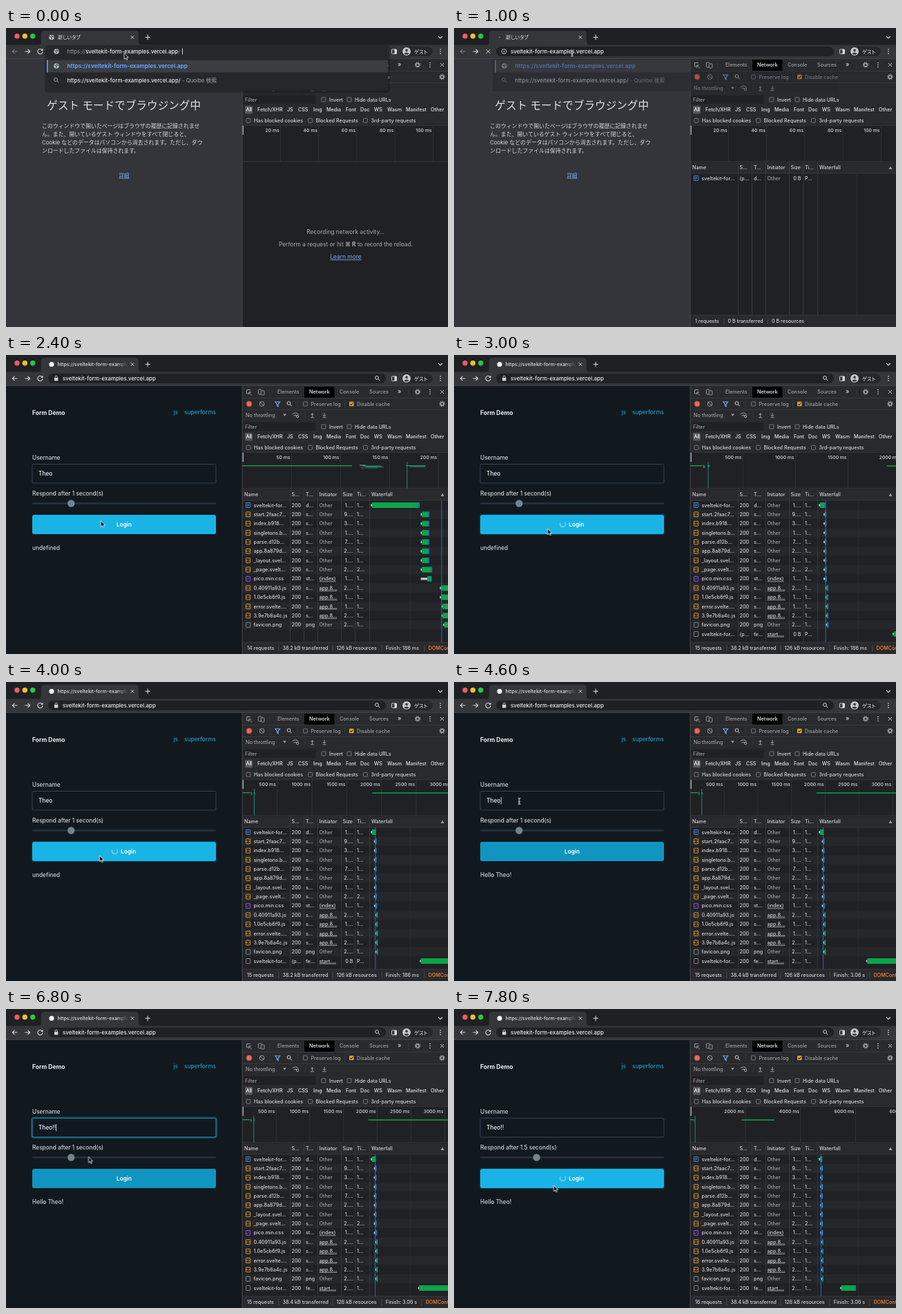
These frames come from a looping animation (640x434 px, 8 s). An HTML page:

```html
<!DOCTYPE html>
<html lang="ja">
<head>
<meta charset="utf-8">
<title>Form demo</title>
<style>
html, body { margin: 0; width: 100%; height: 100%; overflow: hidden; background: #202124; }
svg { display: block; width: 100vw; height: 100vh; font-family: Inter, "Noto Sans CJK JP", "Noto Sans", sans-serif; font-weight: 500; }
.thin { font-weight: 400; }
.phase { animation: 8s step-end -30ms infinite; }
.pointer { animation: move 8s ease-in-out -30ms infinite; }
.spin { animation: spin 1s steps(5) -30ms infinite; }
.late { animation-delay: -230ms; }
.kana { font-feature-settings: "palt"; }
@keyframes spin { to { transform: rotate(360deg); } }
@keyframes move {
  0%, 22% { transform: translate(171px, 36.5px); }
  32%, 53% { transform: translate(135.5px, 252px); }
  57%, 77.5% { transform: translate(94.5px, 173px); }
  83.5%, 90% { transform: translate(119.5px, 214.5px); }
  95%, 100% { transform: translate(144.5px, 256px); }
}
</style>
</head>
<body>
<svg id="stage" viewBox="0 0 640 434"></svg>
<script>
const LOOP = 8000;
const INK = '#d2d4d7', DIM = '#9aa0a6', LINE = '#3e4145', BAR = '#292a2d', DARK = '#202124';
const GREEN = '#0ba54a', BLUE = '#1a86e8', LINK = '#7cacf8';
const rules = {};

// Markup shown only between two times of the loop.
function during(from, to, markup) {
  const name = `from${from}to${to}`;
  const pc = ms => ms / LOOP * 100 + '%';
  rules[name] = `@keyframes ${name}{0%{opacity:0}${pc(from)}{opacity:1}${pc(to)}{opacity:0}}`;
  return `<g class="phase" style="animation-name:${name}">${markup}</g>`;
}
const text = (x, y, s, fill = INK, size = 7.2, extra = '') =>
  `<text x="${x}" y="${y + size * .36}" fill="${fill}" font-size="${size}" ${extra}>${s}</text>`;
const box = (x, y, w, h, fill, extra = '') =>
  `<rect x="${x}" y="${y}" width="${w}" height="${h}" fill="${fill}" ${extra}/>`;
const dot = (x, y, r, fill, extra = '') => `<circle cx="${x}" cy="${y}" r="${r}" fill="${fill}" ${extra}/>`;
const line = (d, stroke = INK, w = 1, extra = '') =>
  `<path d="${d}" fill="none" stroke="${stroke}" stroke-width="${w}" ${extra}/>`;
const frame = (x, y, w, h, stroke, r = 1, fill = 'none') =>
  box(x, y, w, h, fill, `rx="${r}" stroke="${stroke}" stroke-width=".9"`);
const cross = (x, y, r, c = INK) => line(`M${x - r} ${y - r}l${2 * r} ${2 * r}m0 ${-2 * r}l${-2 * r} ${2 * r}`, c);
const dots = (x, y) => [-3, 0, 3].map(d => dot(x, y + d, .85, INK)).join('');
const lens = (x, y, c = INK) => dot(x - 1, y - 1, 2.4, 'none', `stroke="${c}"`) + line(`M${x + 1} ${y + 1}l2.4 2.4`, c);
const gear = (x, y) => dot(x, y, 2.3, 'none', `stroke="${DIM}" stroke-width="1.6"`) +
  dot(x, y, 3.6, 'none', `stroke="${DIM}" stroke-width="1.3" stroke-dasharray="1.4 1.43"`);
const globe = (x, y) => dot(x, y, 3.8, '#b9bcc0') + line(`M${x - 3} ${y - 1}l2.5 .5 1 1.5-1.5 2M${x} ${y - 3.4}l.5 2 2.8 .8`, '#4a4d52', 1.1);
const check = (x, y, label, c = INK) => frame(x - 3, y - 3, 6, 6, '#7d8186') + text(x + 8, y, label, c);
const thin = markup => `<g class="thin">${markup}</g>`;
const bold = 'font-weight="700"', semi = 'font-weight="600"';
const mid = 'text-anchor="middle"';

/* ---------- browser window ---------- */
const SITE = 'sveltekit-form-examples.vercel.app';

function chrome() {
  return box(0, 0, 640, 25, '#1f2023') +
    dot(16, 11.8, 3.7, '#ec5f57') + dot(27.3, 11.8, 3.7, '#f4bd2e') + dot(38.7, 11.8, 3.7, '#29c840') +
    '<path d="M46 25q5 0 5-5V9q0-5 5-5h131q5 0 5 5v11q0 5 5 5z" fill="#35363a"/>' +
    cross(183, 13.5, 2.1) + line('M201.500 13.500h7.500m-3.750-3.750v7.500', '#d6d8db', 1.1) +
    line('M626 12l3 3 3-3', INK, 1.1) +
    box(0, 24.500, 640, 20, '#35363a') + box(0, 44, 640, .8, '#47494d') +
    during(0, 1200, backArrow('#797c80')) + during(1200, 8000, backArrow(INK)) +
    line('M27.500 34h7m-3-3.200l3.200 3.200-3.200 3.200', '#dcdee1', 1.1) +
    during(0, 1000, reload()) + during(1000, 1200, cross(49.5, 34, 2.8, '#dcdee1')) + during(1200, 8000, reload()) +
    frame(558.5, 31, 7, 6.5, '#dcdee1') + box(562.500, 31, 3, 6.500, '#dcdee1') +
    box(573, 27, 45, 14, '#25272a', 'rx="7"') + dot(580, 34, 6, '#c4c7cb') +
    dot(580, 32.300, 1.900, '#3c4043') + '<path d="M576.300 37.500q3.700-4 7.400 0-3.700 2.500-7.400 0z" fill="#3c4043"/>' +
    text(591, 34, 'ゲスト', '#e8eaed', 7.4, 'class="kana"') + dots(629, 34) +
    during(0, 1000, globe(66, 13.5)) + during(1000, 1200, dot(66, 13.5, .8, DIM)) +
    during(0, 1200, text(75, 13.5, '新しいタブ', '#dfe1e4', 7.2, 'class="kana"')) +
    during(1200, 8000, dot(66, 13.5, 3.6, '#f1f3f4') +
      `<g mask="url(#fade)">${text(74.5, 13.5, 'https://' + SITE, '#dfe1e4', 7, 'clip-path="url(#tab)"')}</g>`);
}
const backArrow = c => line('M16.500 34h-7m3-3.200l-3.200 3.200 3.200 3.200', c, 1.1);
const reload = () => line('M52.300 31.800a3.600 3.600 0 1 0 .8 2.600', '#dcdee1', 1.1) + '<path d="M53.500 29.800v3.200h-3.200z" fill="#dcdee1"/>';

function addressBar() {
  const lock = box(70, 33, 5.4, 4.4, INK, 'rx=".7"') + line('M71.200 33v-1.300a1.500 1.500 0 0 1 3 0v1.300', INK, .9);
  const info = dot(72.5, 34, 3.4, 'none', `stroke="${INK}" stroke-width=".9"`) + line('M72.500 33.300v2.600m0-4v.8', INK, .9);
  return during(1000, 8000, box(61, 27, 489, 14, DARK, 'rx="7"') + text(82, 34, SITE, '#eceef0', 7.9)) +
    during(1000, 1200, info) + during(1200, 8000, lock + lens(538, 34));
}

function suggestions() {
  const rows = width => box(59, 46.500, width, 18, '#3a3d42') + box(59, 46.500, 1.800, 18, '#5a94f2') + globe(73, 55) +
    text(88.5, 55, 'https://' + SITE, '#659df6', 8.2, bold) + lens(73, 76, DIM) +
    text(88.5, 76, `https://${SITE}/<tspan fill="#a0a4a9" font-weight="400"> - Quolbe 検索</tspan>`, '#e8eaed', 7.85);
  const open = box(56, 25, 500, 69, '#000', 'rx="5" opacity=".22"') + box(59, 25, 494, 66, '#25272b', 'rx="4"') + globe(73, 34) +
    text(88.5, 34, `https://<tspan fill="#f0f1f3" font-weight="500">${SITE}</tspan>/`, DIM, 7.85, 'class="thin"') + rows(494);
  const caret = box(255, 29.500, .8, 9, '#fff');
  const fading = `<g opacity=".5">${box(56, 45, 286, 47, '#25272b') + rows(283)}</g>` +
    box(342, 62, 214, 30, '#25272b', 'opacity=".35"');
  return during(0, 1000, open + caret) + during(1000, 1200, fading);
}

/* ---------- page ---------- */
function guestPage() {
  const lines = ['このウィンドウで開いたページはブラウザの履歴に記録されませ', 'ん。また、開いているゲスト ウィンドウをすべて閉じると、',
    'Cookie などのデータはパソコンから消去されます。ただし、ダウ', 'ンロードしたファイルは保持されます。'];
  return box(0, 44.8, 342, 389.2, '#33353a') +
    thin(text(170.7, 112.5, 'ゲスト モードでブラウジング中', '#dfe1e4', 15.6, mid) +
      lines.map((s, i) => text(52, 142.3 + i * 11.8, s, '#d8dadd', 7.9)).join('') +
      text(171, 214, '詳細', LINK, 7.5, mid + ' text-decoration="underline"'));
}

function button(lit, glow, busy, late) {
  const ring = busy ? `<g transform="translate(157.500 245.500)"><circle class="spin ${late}" r="4" fill="none" stroke="#fff" stroke-opacity=".55" stroke-width="1.200" stroke-dasharray="17 8.130" transform="rotate(-40)"/></g>` : '';
  return (glow ? box(36.3, 230.3, 269.4, 31.4, '#1095c1', 'rx="4" opacity=".15"') : '') +
    box(38, 232, 266, 28, lit ? '#1ab3e6' : '#1095c1', 'rx="2.500"') + ring +
    text(busy ? 177.3 : 171, 245.8, 'Login', '#fff', 8.2, mid + ' ' + semi);
}

function formPage() {
  const label = '#cbd3d9', white = '#edf0f3', link = '#1c97c2', S = 8.3;
  const value = s => text(47, 172.3, s, white, S);
  const caret = x => box(x, 167, .8, 10.5, white);
  const thumb = x => dot(x, 215.5, 5.2, '#73848f');
  return box(0, 44.8, 342, 389.2, '#11191f') +
    text(38, 83.5, 'Form Demo', white, 8.5, bold) +
    text(249, 83.5, 'js', link, S, 'text-anchor="end"') + text(304, 83.5, 'superforms', link, S, 'text-anchor="end"') +
    text(38, 149, 'Username', label, S) +
    frame(38, 158.5, 266, 27.5, '#374956', 2) +
    during(4800, 7000, box(37, 157.5, 268, 29.5, 'none', 'rx="3" stroke="#1095c1" stroke-opacity=".35" stroke-width="2"') +
      frame(38, 158.5, 266, 27.5, '#1495c0', 2)) +
    during(1200, 5600, value('Theo')) + during(5600, 5800, value('Theo!')) + during(5800, 8000, value('Theo!!')) +
    during(4600, 5200, caret(67.9)) + during(5600, 5800, caret(70.2)) + during(5800, 6400, caret(72.4)) + during(6800, 7000, caret(72.4)) +
    during(1200, 7000, text(38, 201.5, 'Respond after 1 second(s)', label, S)) +
    during(7000, 8000, text(38, 201.5, 'Respond after 1.5 second(s)', label, S)) +
    box(38, 214.2, 266, 2.6, '#24333e', 'rx="1.300"') +
    during(1200, 7000, thumb(94.3)) + during(7000, 8000, thumb(119.6)) +
    during(1200, 2400, button()) + during(2400, 2800, button(true)) + during(2800, 3000, button(true, true)) +
    during(3000, 4200, button(true, true, true, '')) + during(4200, 4400, button(true, true)) +
    during(4400, 7500, button()) + during(7500, 7800, button(true)) + during(7800, 8000, button(true, true, true, 'late')) +
    during(1200, 4200, text(38, 280, 'undefined', label, S)) + during(4200, 8000, text(38, 280, 'Hello Theo!', label, S));
}

/* ---------- developer tools ---------- */
function toolbars() {
  const tabs = [[393, 'Elements'], [483, 'Console'], [526, 'Sources']];
  const types = [[364, 'Fetch/XHR'], [407, 'JS'], [423, 'CSS'], [445, 'Img'], [464, 'Media'], [492, 'Font'], [513, 'Doc'],
    [533, 'WS'], [552, 'Wasm'], [579, 'Manifest'], [615, 'Other']];
  const arrow = (x, dir) => line(`M${x} ${87 - 3 * dir}v${5 * dir}m-2.300 ${-2 * dir}l2.300 ${2.2 * dir} 2.300 ${-2.2 * dir}M${x - 2.5} 90.800h5`, DIM);
  return box(342, 44.8, 298, 389.2, DARK) + box(342, 44.8, 298, 97, BAR) +
    box(432, 46, 43.5, 16, '#000') +
    [62, 79, 141.5].map(y => box(342, y, 298, .7, LINE)).join('') +
    line('M354 50.500h-5.500v5.500h2m1-2l4.500 4.500m-4.500-4.500v3.500m0-3.500h3.500', DIM) +
    frame(365.5, 50, 4.5, 7, DIM) + frame(369.5, 52, 4.5, 6, DIM, 1, BAR) + box(381, 49, .7, 10, LINE) +
    tabs.map(([x, s]) => text(x, 53.8, s, DIM)).join('') + text(439, 53.8, 'Network', '#f1f3f4', 7.3) +
    text(567, 53, '»', INK, 9) + box(582, 49, .7, 10, LINE) + gear(596, 53.5) + dots(614, 53.5) + cross(631.5, 53.5, 2.4) +
    dot(352, 71, 3.9, '#e8695f') + dot(352, 71, 4.2, 'none', 'stroke="#8b3a35" stroke-width=".8"') +
    dot(370.5, 71, 3.4, 'none', `stroke="${DIM}"`) + line('M368 68.500l5 5', DIM) + box(382, 66, .7, 10, LINE) +
    line('M389.800 68h7l-2.700 3.400v3.300l-1.600-1v-2.300z', LINK, 1.1) + lens(410.5, 71, INK) + box(422, 66, .7, 10, LINE) +
    check(433.5, 71, 'Preserve log', DIM) + box(490, 66, .7, 10, LINE) +
    box(497, 67.700, 6.600, 6.600, '#f0a02c', 'rx="1"') + line('M498.500 71l1.400 1.500 2.500-3', DARK, 1.1) +
    text(508, 71, 'Disable cache', DIM) + gear(631.5, 71) +
    text(347, 87.3, 'No throttling', DIM) + '<path d="M401 85.500h5l-2.500 3.300z" fill="#9aa0a6"/>' +
    line('M414.500 86q4.500-4 9 0m-7 2.200q2.500-2.200 5 0', DIM) + dot(422, 89, 1.8, 'none', `stroke="${DIM}"`) +
    box(433, 82, .7, 10, LINE) + arrow(443.5, -1) + arrow(461, 1) +
    box(343.5, 97.5, 105, 12.5, DARK) + text(346, 104, 'Filter', DIM) + check(460, 104, 'Invert') + check(497, 104, 'Hide data URLs') +
    box(346, 113, 11, 11.500, '#55585d', 'rx="1.500"') + text(347.5, 118.9, 'All', '#fff', 7.1) + box(360.5, 114, .7, 10, LINE) +
    types.map(([x, s]) => text(x, 118.9, s, '#e4e6e8', 7.15)).join('') +
    check(351, 134.3, 'Has blocked cookies') + check(440.5, 134.3, 'Blocked Requests') + check(520.5, 134.3, '3rd-party requests');
}

// Overview strip: `span` ms across the panel width.
function overview(span, step, loaded) {
  const at = ms => 342 + ms / span * 298;
  const bar = (a, b, y, c = '#1f9a4c', h = 1.4) => box(at(a), y, at(b) - at(a), h, c);
  let out = box(342, 142, 298, 52, DARK);
  for (let ms = step; at(ms) < 670; ms += step)
    out += box(at(ms), 142, .7, 52, '#37393d') + text(at(ms) - 1.5, 149, ms + ' ms', INK, 6.8, 'text-anchor="end"');
  if (loaded) {
    out += bar(0, 112, 160) + bar(120, 126, 159.5, '#8c8f94') + bar(123, 142, 160.5) + bar(126, 144, 162.2, '#2c86b8', 1) +
      bar(121, 138, 163.5, '#1f7d54', 1) + bar(167, 187, 160) + bar(171, 187, 161.6, '#2c86b8', 1) +
      box(at(168), 155, .9, 39, '#23918c');
    if (span > 1900) out += bar(1870, Math.max(1871, Math.min(3060, span)), 160.3, GREEN, 1.5);
  }
  return out + box(342.3, 142, 1.5, 13, '#c4c6c9') + box(342, 193.5, 298, .8, LINE);
}

const rowY = i => 218 + 13.36 * i;

// Waterfall column: `total` ms across 112 units.
function waterfall(total) {
  const k = 112 / total;
  const bar = (i, start, len, wait = 0) => {
    const x = 528.3 + start * k, y = rowY(i), w = Math.max(.6, len * k), g = x + 1.7 + wait * k;
    return box(x, y - 1.7, 1.7 + wait * k, 3.4, '#c3c5c8') + box(g, y - 4, w, 8, GREEN) + box(g + w, y - 4, 1.4, 8, BLUE);
  };
  let out = box(585, 211, .6, 206, '#303236') + bar(0, 0, 112);
  for (let i = 1; i < 7; i++) out += bar(i, 120, 15);
  out += bar(7, 120, 22) + bar(8, 120, 8, 13);
  for (let i = 9; i < 14; i++) out += bar(i, i < 11 ? 166 : i < 13 ? 170 : 174, 15);
  if (total > 1000) out += bar(14, 1870, 1190);
  return out + box(528 + 170 * k, 211, .9, 206, '#1f78d8');
}

function icon(kind, y) {
  const c = { doc: '#4a8df0', js: '#e8a33a', css: '#a05af0', img: '#8b8f94' }[kind];
  const art = { doc: `M348.800 ${y - 1.3}h3.400m-3.400 1.500h3.400m-3.400 1.500h2`, js: `M349.700 ${y - 1.4}l-1.300 1.400 1.300 1.400m1.600-2.800l1.300 1.400-1.300 1.400`,
    css: `M348.700 ${y + 1.9}l3.400-3.600`, img: '' }[kind];
  return frame(347.5, y - 3.5, 6.2, 7, c, .6) + line(art, c, .8);
}

function row(i, kind, name, status, type, from, size, time) {
  const y = rowY(i), linked = from !== 'Other';
  return icon(kind, y) + text(358.5, y, name) + text(413.5, y, status) + text(434, y, type) +
    text(453.5, y, from, linked ? INK : DIM, 7.2, linked ? 'text-decoration="underline"' : '') +
    text(502.5, y, size, INK, 7.2, 'text-anchor="end"') + text(508, y, time);
}

function table() {
  const edges = [411, 431, 451, 485, 505, 526];
  const heads = [[345, 'Name'], [413.5, 'S…'], [434, 'T…'], [453.5, 'Initiator'], [487.5, 'Size'], [508, 'Ti…'], [529, 'Waterfall']];
  const scripts = [['start.2faac7…', 9], ['index.b918…', 3], ['singletons.b…', 1], ['parse.d12b…', 7], ['app.8a879d…', 2], ['_layout.svel…', 1], ['_page.svelt…', 2]];
  const lazy = [['0.40911a93.js', 2], ['1.0e5cb6f9.js', 1], ['error.svelte.…', 1], ['3.9e7b6a4c.js', 2]];
  const page = 'sveltekit-for…';
  let stripes = '';
  for (let i = 1; i < 15; i += 2) stripes += box(342, rowY(i) - 6.7, 298, 13.36, '#25272a');
  const base = box(342, 194.3, 298, 222.7, DARK) + during(1200, 8000, stripes) +
    box(342, 194.3, 298, 16.5, BAR) + box(342, 210.6, 298, .7, LINE);
  const grid = edges.map(x => box(x, 194.3, .7, 222.7, LINE)).join('');
  const titles = heads.map(([x, s]) => text(x, 202.8, s)).join('') + '<path d="M629.500 205l2.500-4.500 2.500 4.500z" fill="#9aa0a6"/>';
  const rows = row(0, 'doc', page, 200, 'd…', 'Other', '1.…', '1…') +
    scripts.map(([n, s], i) => row(i + 1, 'js', n, 200, 's…', 'Other', s + '.…', i === 6 ? '2…' : '1…')).join('') +
    row(8, 'css', 'pico.min.css', 200, 'st…', '(index)', '1.…', '1…') +
    lazy.map(([n, s], i) => row(i + 9, 'js', n, 200, 's…', 'app.8…', s + '.…', '1…')).join('') +
    row(13, 'img', 'favicon.png', 200, 'png', 'Other', '2.…', '1…');
  let falls = during(1000, 1200, box(583, 211, .6, 206, '#37393d')) + during(1200, 3000, waterfall(186));
  for (let t = 3000; t < 4200; t += 200) falls += during(t, t + 200, waterfall(t - 1040));
  falls += during(4200, 7800, waterfall(3060)) + during(7800, 8000, waterfall(6760));
  return base + grid + titles + during(1000, 1200, row(0, 'doc', page, '(p…', 'd…', 'Other', '0 B', 'P…')) +
    during(1200, 8000, rows) +
    during(3000, 4200, row(14, 'img', page, '(p…', 'fe…', 'start.…', '0 B', 'P…')) +
    during(4200, 8000, row(14, 'img', page, 200, 'fe…', 'start.…', '2.…', '1…')) + falls;
}

function statusBar() {
  const bar = parts => box(342, 417, 298, 17, BAR) + box(342, 416.7, 298, .7, LINE) +
    parts.map(([x, s], i) => (i ? box(x - 6, 421, .7, 9, '#55585c') : '') +
      text(x, 425.3, s, i === 4 ? '#f58236' : INK, 7.15)).join('');
  const full = (n, kb, finish, x) => bar([[349, n + ' requests'], [400.5, kb + ' kB transferred'], [478.5, '126 kB resources'],
    [549.7, 'Finish: ' + finish], [x, 'DOMContentLoaded: 170 ms']]);
  return during(1000, 1200, bar([[349, '1 requests'], [396.5, '0 B transferred'], [460, '0 B resources']])) +
    during(1200, 3000, full(14, 38.2, '186 ms', 611.5)) + during(3000, 4200, full(15, 38.2, '186 ms', 611.5)) +
    during(4200, 7800, full(15, 38.4, '3.06 s', 607.5)) + during(7800, 8000, full(16, 38.4, '3.06 s', 607.5));
}

function devtools() {
  const hint = text(491.5, 296, 'Recording network activity…', '#a7abb0', 8.4, mid) +
    text(492, 314, 'Perform a request or hit <tspan font-weight="700">⌘ R</tspan> to record the reload.', '#a7abb0', 8.35, mid) +
    text(492, 332, 'Learn more', LINK, 8.4, mid + ' text-decoration="underline"');
  let spans = during(0, 1200, overview(108, 20)) + during(1200, 3000, overview(210, 50, true));
  for (let t = 3000; t < 4200; t += 200) spans += during(t, t + 200, overview(t - 1040, 500, true));
  spans += during(4200, 7800, overview(3053, 500, true)) + during(7800, 8000, overview(7480, 2000, true));
  return `<g clip-path="url(#panel)">${toolbars() + spans + during(0, 1000, thin(hint)) + during(1000, 8000, table()) + statusBar()}</g>` +
    box(341.6, 44.8, .9, 389.2, '#4a4c50');
}

function pointer() {
  const arrow = '<path d="M0 0V8.600L2 6.800 3.300 9.800 4.800 9.100 3.500 6.200H6.100Z" fill="#000" stroke="#fff" stroke-width=".8"/>';
  const shape = w => `<path d="M-1.800-4.500q1.800 0 1.800 1.200V3.300q0 1.200-1.800 1.200M1.800-4.500q-1.800 0-1.800 1.200M1.800 4.500q-1.800 0-1.800-1.200M-1.200 1h2.400" fill="none" ${w}/>`;
  const beam = shape('stroke="#111" stroke-width="2"') + shape('stroke="#fff" stroke-width="1"');
  return `<g class="pointer">${during(0, 1000, arrow) + during(1000, 1900, beam) + during(1900, 4450, arrow) +
    during(4450, 6350, beam) + during(6350, 8000, arrow)}</g>`;
}

const defs = `<defs>
  <clipPath id="panel"><rect x="342" y="44.8" width="298" height="389.2"/></clipPath>
  <clipPath id="tab"><rect x="74" y="6" width="102" height="16"/></clipPath>
  <linearGradient id="ramp" gradientUnits="userSpaceOnUse" x1="160" x2="177" y1="0" y2="0">
    <stop stop-color="#fff"/><stop offset="1" stop-color="#000"/></linearGradient>
  <mask id="fade" maskUnits="userSpaceOnUse" x="70" y="4" width="110" height="20"><rect x="70" y="4" width="110" height="20" fill="url(#ramp)"/></mask>
</defs>`;

const scene = defs + during(0, 1200, guestPage()) + during(1200, 8000, formPage()) +
  devtools() + chrome() + addressBar() + suggestions() + pointer();
const sheet = document.createElement('style');
sheet.textContent = Object.values(rules).join('\n');
document.head.append(sheet);
document.getElementById('stage').innerHTML = scene;
</script>
</body>
</html>
```
